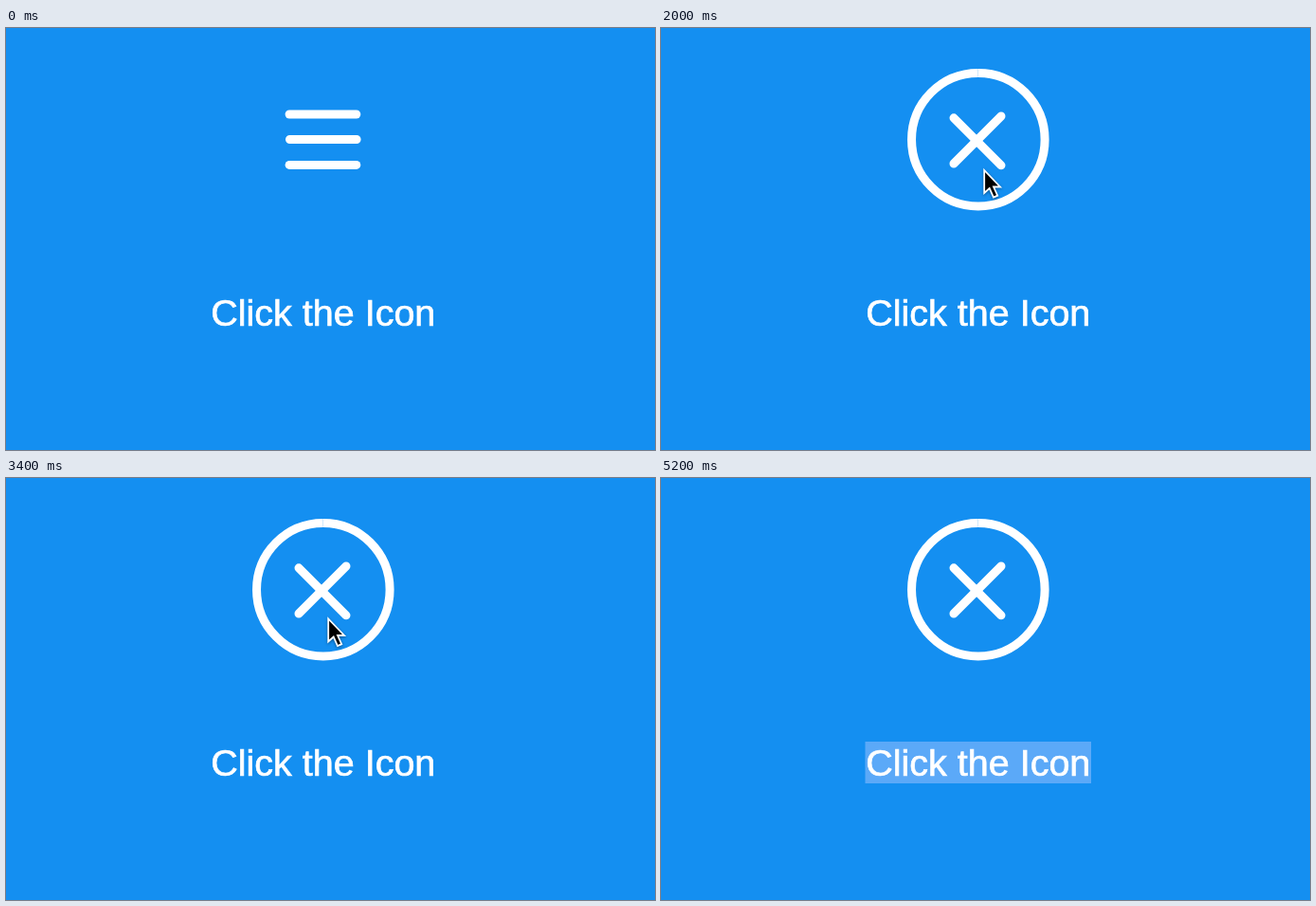
An HTML page for the animation above (5.3 s loop, 685 by 445 pixels).

```html
<!DOCTYPE html>
<html lang="en">
<head>
<meta charset="utf-8">
<title>Menu icon</title>
<style>
  html, body { margin: 0; width: 100%; height: 100%; overflow: hidden; background: #148ff1; }
  svg { display: block; }
  #icon path { fill: none; stroke: #fff; stroke-width: 9; }
  .bar { stroke-linecap: round; }
  text {
    font: 39.5px "Liberation Sans", Arial, sans-serif;
    fill: #fff; stroke: #fff; stroke-width: .7; text-anchor: middle;
  }
  #cursor { filter: drop-shadow(0 1.5px 1.5px rgba(0, 0, 0, .4)); }
</style>
</head>
<body>
<svg width="685" height="445" viewBox="0 0 685 445">
  <rect id="selection" x="215.5" y="278" width="238.5" height="44" fill="#5ba9f8"/>
  <text x="334.8" y="314">Click the Icon</text>
  <g id="icon">
    <path id="top" class="bar"/>
    <path id="bottom" class="bar"/>
    <path id="trail" opacity=".4"/>
    <path id="loop"/>
  </g>
  <path id="cursor" d="M1.2 2V26L6.7 21L11 30.5L15.2 28.7L11 19.5H18Z"
        fill="#000" stroke="#fff" stroke-width="1.8"/>
</svg>
<script>
const LOOP = 5300, STEP = 100, RADIUS = 70.3;
const el = id => document.getElementById(id);
const set = (id, attrs) => {
  for (const name in attrs) el(id).setAttribute(name, attrs[name]);
};

// The middle bar runs right, curves up and continues counter-clockwise as the ring.
const track = 'M264.3 117.5H370C390 117.5 401 115 399.5 103C397 70 368 47.4 334.8 47.4' +
  `a${RADIUS} ${RADIUS} 0 0 0 0 ${2 * RADIUS}a${RADIUS} ${RADIUS} 0 0 0 0 ${-2 * RADIUS}`;
set('loop', { d: track });
set('trail', { d: track });
const END = el('loop').getTotalLength(), RING = END - 2 * Math.PI * RADIUS;
const MIDDLE = 70.5, HALF = 35.3;

const opens = [885, 2848, 4400], closes = [2140, 3970];
// Pointer stops: ms, x, y
const stops = [
  [100, 370, 376], [600, 343, 93], [1000, 343, 128], [1600, 340, 168],
  [2000, 340, 148], [4800, 338, 145], [5200, 710, 330]
];

const clamp = k => Math.max(0, Math.min(1, k));
const mix = (a, b, k) => a + (b - a) * k;
const smooth = k => k * k * (3 - 2 * k);
const outBack = (k, pull) => 1 + (pull + 1) * (k - 1) ** 3 + pull * (k - 1) ** 2;

function opening(t) {
  return {
    angle: 45 * smooth(clamp(t / 540)),
    from: mix(MIDDLE - HALF, RING, clamp(t / 215)),
    to: mix(MIDDLE + HALF, END, clamp(t / 400) ** 2),
    cap: t > 0 ? 'butt' : 'round'
  };
}

function closing(t) {
  const angle = 45 * (1 - outBack(clamp(t / 600), 2.1));
  if (t < 170) return { angle, from: RING, to: mix(END, RING, t / 170), cap: 'butt' };
  const half = HALF * outBack(clamp((t - 170) / 600), 3.5);
  return { angle, from: MIDDLE - half, to: MIDDLE + half, cap: 'round' };
}

function poseAt(t) {
  const last = list => list.findLast(start => start <= t) ?? 0;
  const open = last(opens), close = last(closes);
  return open >= close ? opening(open && t - open) : closing(t - close);
}

function drawBar(id, y, angle, side) {
  const a = angle * Math.PI / 180, x = 369.8 - Math.max(0, angle) * .24;
  set(id, { d: `M${x} ${y}l${-70.7 * Math.cos(a)} ${side * 70.7 * Math.sin(a)}` });
}

function drawSpan(id, from, to, cap) {
  set(id, {
    'stroke-dasharray': `${Math.max(0, to - from)} 9999`,
    'stroke-dashoffset': -from,
    'stroke-linecap': cap,
    visibility: to > from ? 'visible' : 'hidden'
  });
}

function pointerAt(t) {
  const i = Math.max(1, stops.findIndex(stop => stop[0] > t));
  const [t0, x0, y0] = stops[i - 1], [t1, x1, y1] = stops[i];
  const k = smooth(clamp((t - t0) / (t1 - t0)));
  return [mix(x0, x1, k), mix(y0, y1, k)];
}

function render(t) {
  const { angle, from, to, cap } = poseAt(t), before = poseAt(t - STEP);
  drawBar('top', 91 + angle * .045, angle, 1);
  drawBar('bottom', 144.4 + angle * .01, angle, -1);
  drawSpan('loop', from, to, cap);
  // The tail's previous position lingers while the ring unrolls.
  drawSpan('trail', before.from, cap === 'butt' ? Math.min(from, to) : 0, 'butt');

  set('cursor', {
    transform: `translate(${pointerAt(t)})`,
    visibility: t >= 100 && t < 5200 ? 'visible' : 'hidden'
  });
  set('selection', { visibility: t >= 5100 ? 'visible' : 'hidden' });
}

const begin = performance.now();
function tick() {
  const t = (performance.now() - begin) % LOOP;
  render(Math.floor(t / STEP) * STEP);
  requestAnimationFrame(tick);
}
tick();
</script>
</body>
</html>
```
